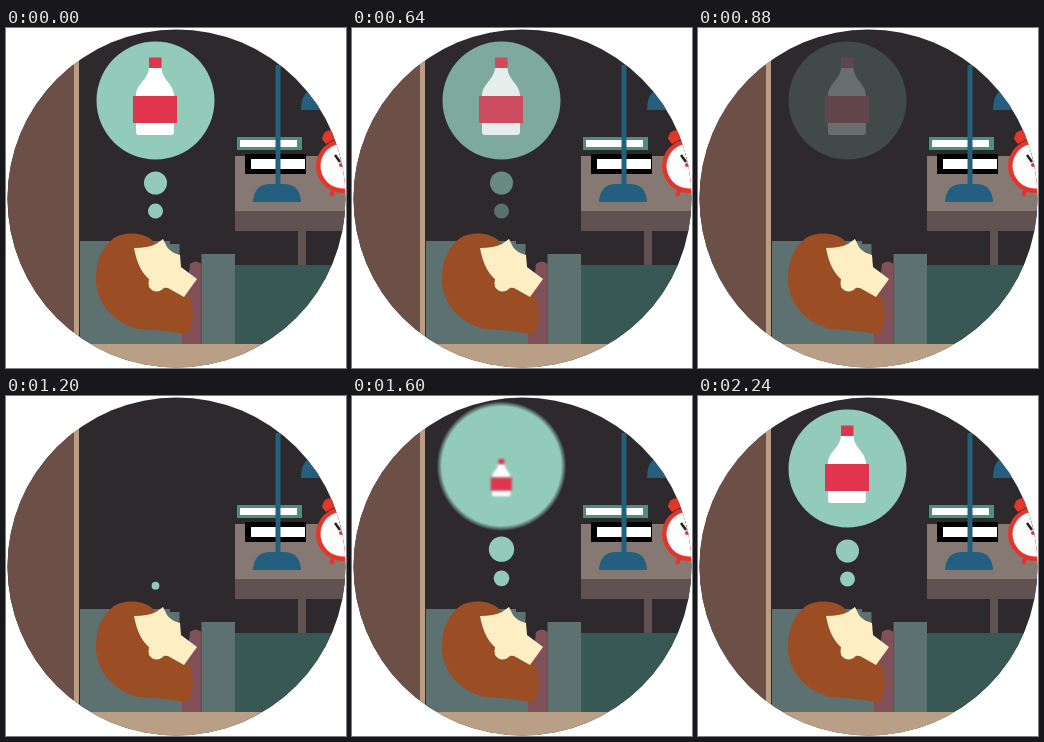
Write an HTML page with a canvas that moves like this. It is 340 px wide and 340 px high and loops after 2.64 s.

```html
<!DOCTYPE html>
<html lang="en">
<head>
<meta charset="utf-8">
<title>Dreaming of a drink</title>
<style>
html, body { margin: 0; height: 100%; overflow: hidden; background: #fff; }
canvas { display: block; width: 340px; height: 340px; }
</style>
</head>
<body>
<canvas id="stage" width="340" height="340"></canvas>
<script>
const ctx = document.getElementById('stage').getContext('2d');
const LOOP = 2640, STEP = 80, CX = 149.5;
const MINT = '146,203,186', RED = '#e0344f', BLUE = '#23607f', CLOCK = '#e3362a';

// y: resting centre, pivot: point it grows from, start/dur: pop-in, end/fade: fade-out
const bubbles = [
  { y: 183, r: 7.5, pivot: 197, start: 1120, dur: 600, end: 785, fade: 330, back: 1.7 },
  { y: 155, r: 11.5, pivot: 173, start: 1245, dur: 600, end: 880, fade: 400, back: 1.7 },
  { y: 72.5, r: 59, pivot: 117, start: 1370, dur: 580, end: 960, fade: 400, back: 1.9 }
];
const bottle = { pivot: 94, start: 1520, dur: 660, end: 960, fade: 400, back: 1.7 };

const clamp = v => Math.max(0, Math.min(1, v));

function pop(o, t) {
  const q = clamp((t - o.start) / o.dur) - 1;
  return Math.max(0, 1 + (o.back + 1) * q ** 3 + o.back * q * q);
}
const sizeAt = (o, t) => t < 1000 ? 1 : t < 1200 ? 0 : pop(o, t);
const alphaAt = (o, t) => t < 1000 ? clamp((o.end - t) / o.fade) : 1;

function rect(color, x, y, w, h) {
  ctx.fillStyle = color;
  ctx.fillRect(x, y, w, h);
}
function shape(color, d) {
  ctx.fillStyle = color;
  ctx.fill(new Path2D(d));
}
function disc(color, x, y, r) {
  ctx.fillStyle = color;
  ctx.beginPath();
  ctx.arc(x, y, r, 0, 7);
  ctx.fill();
}
function line(color, width, d) {
  ctx.strokeStyle = color;
  ctx.lineWidth = width;
  ctx.stroke(new Path2D(d));
}

function drawRoom() {
  rect('#2d292d', 0, 0, 340, 340);
  rect('#6c5047', 0, 0, 68, 340);
  rect('#bb9d83', 68, 0, 5, 340);

  // night stand
  rect('#867974', 229, 128, 111, 55);
  rect('#5f5250', 229, 183, 111, 20);
  rect('#5f5250', 292, 203, 8, 34);

  // books
  rect('#4b8f80', 231, 109, 65, 13);
  rect('#fff', 234, 112, 57, 7);
  rect('#000', 239, 126, 61, 20);
  rect('#fff', 245, 131, 54, 10);

  // lamp
  rect(BLUE, 269.5, 37, 5, 122);
  shape(BLUE, 'M247 174Q248 156 264 156H278Q294 156 295 174Z');
  shape(BLUE, 'M295 82Q295 62 310 60H340V82Z');

  // alarm clock
  shape(CLOCK, 'M316 111Q317 102 326 102L331 110L320 116Z');
  line(CLOCK, 4, 'M329 158L325 168');
  disc(CLOCK, 337, 138, 27);
  disc('#fff', 337, 138, 22.5);
  line('#222', 2.5, 'M329 127L334 134');
  line('#222', 1.5, 'M334 124L336 133');
  disc(CLOCK, 335, 137, 2);

  // bed
  rect('#5d7170', 74, 213, 90, 103);
  rect('#5d7170', 164, 216, 9.5, 100);
  rect('#5d7170', 164, 290, 20, 26);
  rect('#5d7170', 195.5, 226, 33.5, 90);
  rect('#375855', 229, 237, 111, 79);
  shape('#7f5058', 'M184 236Q190 231 195.5 236V316H176V300Z');
  rect('#b99f86', 73, 316, 267, 24);

  // sleeper
  shape('#9b4d24', 'M108 210C118 203 139 204 147 213L160 240L181 266C189 278 189 298 180 307' +
    'C168 303 148 302 133 301C107 295 88 274 90 246C91 230 98 217 108 210Z');
  shape('#fdeec3', 'M128 220Q142 220 150 216L157 211L161 219Q164 224 174 227L175 239' +
    'L191 251L178 269L162 260Q157 259 157 261Q149 267 143 259Q142 255 143 251Q132 242 128 220Z');
}

// The rim is softened over the distance it travels during a short shutter.
function drawBubble(b, t) {
  const s = sizeAt(b, t), a = alphaAt(b, t);
  if (!s || !a) return;
  const y = b.pivot + (b.y - b.pivot) * s;
  const near = b.r * sizeAt(b, t - 30), far = b.r * sizeAt(b, t + 30);
  const blur = t > 1200 ? Math.min(Math.abs(far - near), b.r * s) / 2 : 0;
  const inner = b.r * s - blur, outer = b.r * s + blur;
  ctx.globalAlpha = a;
  let paint = `rgb(${MINT})`;
  if (blur > .5) {
    paint = ctx.createRadialGradient(CX, y, inner, CX, y, outer);
    paint.addColorStop(0, `rgb(${MINT})`);
    paint.addColorStop(1, `rgba(${MINT},0)`);
  }
  disc(paint, CX, y, blur > .5 ? outer : b.r * s);
  ctx.globalAlpha = 1;
}

function drawTicks() {
  for (let i = 0; i < 10; i++) {
    const a = i * Math.PI / 5;
    disc('rgba(130,120,120,.6)', CX + 53 * Math.sin(a), 72 - 53 * Math.cos(a), .9);
  }
}

function drawBottle(t) {
  const s = sizeAt(bottle, t), a = alphaAt(bottle, t);
  if (!s || !a) return;
  ctx.save();
  ctx.globalAlpha = a;
  if (t > 1500 && t < 1680) ctx.filter = 'blur(1px)';
  ctx.translate(CX, bottle.pivot);
  ctx.scale(s, s);
  ctx.translate(-CX, -bottle.pivot);
  shape('#fff', 'M143 40H155.5C156 52 168 56 168 68H130C130 56 142 52 143 40Z');
  shape('#fff', 'M130 95H168V104Q168 107 165 107H133Q130 107 130 104Z');
  rect(RED, 143, 29.5, 12.5, 10.5);
  rect(RED, 127, 68, 44, 27);
  ctx.restore();
}

function frame(now) {
  const t = Math.floor(now % LOOP / STEP) * STEP;
  ctx.clearRect(0, 0, 340, 340);
  ctx.save();
  ctx.beginPath();
  ctx.arc(170.5, 170.5, 169, 0, 7);
  ctx.clip();
  drawRoom();
  bubbles.forEach(b => drawBubble(b, t));
  if (t >= 1840 && t < 2000) drawTicks();
  drawBottle(t);
  ctx.restore();
}

const begin = performance.now();
function tick() {
  frame(performance.now() - begin);
  requestAnimationFrame(tick);
}
tick();
</script>
</body>
</html>
```
